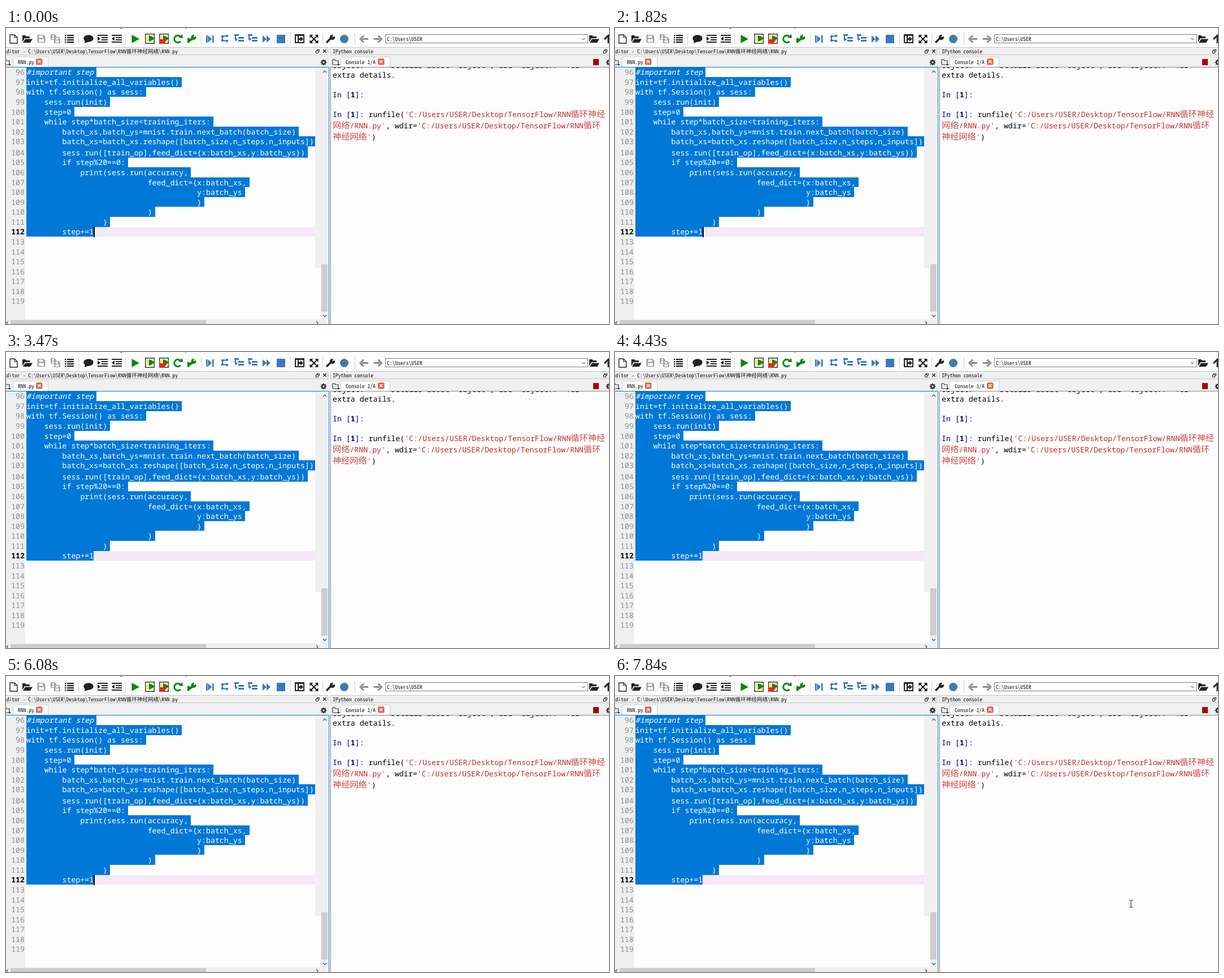
An HTML page with a canvas that plays this animation: 1067x525 px, repeating every 7990 ms.

```html
<!DOCTYPE html>
<html lang="en">
<head>
<meta charset="utf-8">
<title>Editor and console</title>
<style>
html, body { margin: 0; width: 100%; height: 100%; overflow: hidden; background: #fdfdfd; }
canvas { display: block; }
</style>
</head>
<body>
<canvas id="stage" width="1067" height="525"></canvas>
<script>
const W = 1067, H = 525, LOOP = 7990;
const stage = document.getElementById('stage').getContext('2d');
const scene = document.createElement('canvas');
scene.width = W;
scene.height = H;
const g = scene.getContext('2d');
g.textRendering = 'geometricPrecision';

const BLUE = '#0078d7', STEEL = '#3a78bf', GREEN = '#0c870c', BLACK = '#222', GRAY = '#a4a4a4';
const PANEL = '#f0f0f0', PAPER = '#fdfdfd', RED = '#c02a24', NAVY = '#000080';
const CODE = '"Noto Sans Mono", "DejaVu Sans Mono", monospace';
const LABEL = '"Noto Sans Mono CJK SC", "Noto Sans Mono", monospace';
const HAN = '"Noto Sans CJK SC Light", "Noto Sans CJK SC", "Noto Sans CJK JP", sans-serif';
const CHAR = 7.95, ROW = 17.57, LEFT = 36, FIRST = 96;

// Font size at which one monospaced cell has the given advance.
function sizeFor(family, advance) {
  g.font = `100px ${family}`;
  return advance * 100 / g.measureText('0').width;
}
const codeSize = sizeFor(CODE, CHAR), labelSize = sizeFor(LABEL, 4.82);

function rect(x, y, w, h, color) {
  g.fillStyle = color;
  g.fillRect(x, y, w, h);
}
function frame(x, y, w, h, color, width = 1) {
  g.strokeStyle = color;
  g.lineWidth = width;
  g.strokeRect(x, y, w, h);
}
function trace(pts) {
  g.beginPath();
  for (let i = 0; i < pts.length; i += 2) g.lineTo(pts[i], pts[i + 1]);
}
function poly(color, ...pts) {
  trace(pts);
  g.fillStyle = color;
  g.fill();
}
function line(color, width, ...pts) {
  trace(pts);
  g.strokeStyle = color;
  g.lineWidth = width;
  g.stroke();
}
function disc(x, y, r, color) {
  g.beginPath();
  g.arc(x, y, r, 0, 7);
  g.fillStyle = color;
  g.fill();
}
function text(s, x, y, color, font) {
  g.font = font;
  g.fillStyle = color;
  g.fillText(s, x, y);
  return x + g.measureText(s).width;
}
const code = (s, x, y, color, style = '') => text(s, x, y, color, `${style} ${codeSize}px ${CODE}`);
const han = (s, x, y) => text(s, x, y, '#cb4a44', `300 15.2px ${HAN}`);
const label = (s, x, y) => text(s, x, y, '#111', `${labelSize}px ${LABEL}`);

function cross(x, y, r, color, width) {
  line(color, width, x - r, y - r, x + r, y + r);
  line(color, width, x + r, y - r, x - r, y + r);
}
function gear(x, y) {
  for (let i = 0; i < 4; i++) {
    const c = Math.cos(i * Math.PI / 4) * 5.2, s = Math.sin(i * Math.PI / 4) * 5.2;
    line('#333', 2, x - c, y - s, x + c, y + s);
  }
  disc(x, y, 3.9, '#333');
  disc(x, y, 1.7, PANEL);
}
function wrench(x, y, color) {
  line(color, 3.4, x, y + 14, x + 9, y + 5);
  disc(x + 10.5, y + 4.5, 4.6, color);
  poly(PAPER, x + 10, y + 4.5, x + 13, y - 2, x + 17, y + 2);
}
function folder(x, y) {
  poly(BLACK, x, y + 13, x, y + 1, x + 5, y + 1, x + 7, y + 3, x + 13, y + 3, x + 13, y + 6, x + 4, y + 6);
  poly(BLACK, x + 1, y + 14, x + 5, y + 7.5, x + 18, y + 7.5, x + 14, y + 14);
}
function smallFolder(x, y) {
  line('#333', 1.2, x, y + 9, x, y, x + 4, y, x + 5, y + 2, x + 10, y + 2, x + 10, y + 9, x, y + 9);
  poly('#333', x + 8, y + 8, x + 13, y + 8, x + 10.5, y + 11);
}
function floppy(x, y, s) {
  poly(GRAY, x, y, x + s - 3, y, x + s, y + 3, x + s, y + s, x, y + s);
  rect(x + 3, y + 1.5, s - 7, s * 0.28, PAPER);
  rect(x + 2.5, y + s * 0.55, s - 5, s * 0.35, PAPER);
}
function indent(x, dir) {
  rect(x, 12, 18, 2, BLACK);
  rect(x + 7, 16, 11, 2, BLACK);
  rect(x + 7, 20, 11, 2, BLACK);
  rect(x, 24, 18, 2, BLACK);
  const tip = dir > 0 ? x + 5 : x, base = dir > 0 ? x : x + 5;
  poly(BLACK, base, 15, tip, 19, base, 23);
}
function arrow(x, dir, color) {
  line(color, 3, x - 7 * dir, 19.5, x + 4 * dir, 19.5);
  line(color, 3, x + dir, 13.5, x + 7 * dir, 19.5, x + dir, 25.5);
}
function cell(x) {
  rect(x, 10, 17, 18, '#333');
  rect(x + 1.5, 11.5, 14, 15, '#fff');
  rect(x + 1.5, 14, 14, 10, '#f4ea7c');
  poly(GREEN, x + 7, 12.5, x + 18, 18.5, x + 7, 24.5);
}
function stepIcon(x, dir) {
  rect(x, 11, 8, 3, STEEL);
  rect(x + 7, 16, 10, 3, STEEL);
  rect(x + 7, 21, 10, 3, STEEL);
  line(STEEL, 2, x + 2, 14, x + 2, 20, x + 5, 20);
  poly(STEEL, x + 2 - dir * 2, 16, x + 6, 20, x + 2, 24);
}

function toolbar() {
  rect(0, 0, W, 34, PAPER);
  rect(202, 0, 4, 1, '#555');
  rect(317, 0, 2, 1, '#555');
  line(BLACK, 1.4, 7, 12, 15, 12, 20, 17, 20, 27, 7, 27, 7, 11.5);
  line(BLACK, 1.2, 15, 12, 15, 17, 20, 17);
  folder(29, 12);
  floppy(55.5, 12, 14);
  floppy(79, 11, 10);
  floppy(85, 16, 11);
  for (let y = 12; y < 27; y += 4) {
    rect(104, y, 2.5, 2.3, BLACK);
    rect(108, y, 12, 2.3, BLACK);
  }
  g.beginPath();
  g.ellipse(146, 18.5, 8.7, 6.2, 0, 0, 7);
  g.fillStyle = BLACK;
  g.fill();
  poly(BLACK, 140, 21, 147, 24, 139, 27);
  indent(162, 1);
  indent(187, -1);
  poly(GREEN, 222.5, 12, 236, 19.5, 222.5, 27);
  cell(246);
  cell(271);
  poly('#e02a20', 271, 20, 279, 20, 279, 17, 284, 22.5, 279, 28, 271, 28);
  g.beginPath();
  g.arc(304, 19.5, 6.2, 0.7, 5.5);
  g.strokeStyle = GREEN;
  g.lineWidth = 3;
  g.stroke();
  poly(GREEN, 305, 17, 313, 18, 312, 11);
  wrench(321.5, 12, GREEN);
  poly(GREEN, 321, 17, 331, 21, 321, 26);

  rect(354, 13, 2.6, 13, STEEL);
  poly(STEEL, 357.5, 13, 364, 19.5, 357.5, 26);
  rect(365, 13, 2.6, 13, STEEL);
  for (const [x, y] of [[383, 15], [391, 14], [383, 22], [391, 23]]) disc(x, y, 2.3, STEEL);
  line(STEEL, 2, 391, 14, 383, 15, 383, 22, 391, 23);
  stepIcon(404, 1);
  stepIcon(428, -1);
  poly(STEEL, 454, 13, 461, 19.5, 454, 26);
  poly(STEEL, 461, 13, 468, 19.5, 461, 26);
  rect(479, 12, 15, 15, STEEL);

  rect(511, 11, 17, 16, BLACK);
  rect(513, 14, 3, 11, PAPER);
  rect(518, 14, 8, 11, PAPER);
  poly(BLACK, 518, 18, 521, 18, 521, 15, 526, 19.5, 521, 24, 521, 21, 518, 21);
  cross(545, 19.5, 5.5, BLACK, 2.2);
  for (const dx of [-1, 1]) for (const dy of [-1, 1]) {
    const x = 545 + 7.5 * dx, y = 19.5 + 7.5 * dy;
    poly(BLACK, x, y, x - 6 * dx, y, x, y - 6 * dy);
  }
  wrench(567, 12, BLACK);
  disc(598.5, 19.5, 7.5, '#3f7cac');
  arrow(634, -1, '#8c8c8c');
  arrow(657.5, 1, '#8c8c8c');
  rect(671, 11, 359, 16, '#fff');
  frame(671.5, 11.5, 358, 15, '#7d7d7d');
  label(String.raw`C:\Users\USER`, 674, 23);
  line('#444', 1, 1019, 18, 1022, 21, 1025, 18);
  folder(1032, 12);
  line(BLACK, 3, 1059, 20, 1066, 13, 1073, 20);
  line(BLACK, 3, 1066, 13, 1066, 27);
  for (const x of [128, 211, 345, 503, 560, 617]) rect(x, 9, 1, 21, '#d2d2d2');
}

function floatIcon(x) {
  frame(x + 2.5, 38.5, 4, 3, '#222');
  rect(x + 0.5, 41, 5, 4, PANEL);
  frame(x + 0.5, 40.5, 4, 4, '#222');
}
function tab(x, w, name, nameX, closeX) {
  rect(x, 51, w, 18, '#fff');
  line('#cfcfcf', 1, x + 0.5, 69, x + 0.5, 51.5, x + w - 0.5, 51.5, x + w - 0.5, 69);
  label(name, nameX, 63.5);
  g.beginPath();
  g.roundRect(closeX, 54, 11.5, 11.5, 2.5);
  g.fillStyle = '#e2654f';
  g.fill();
  cross(closeX + 5.75, 59.75, 2.5, '#fff', 1.6);
}
function docks() {
  rect(0, 34, W, 36, PANEL);
  frame(-1.5, 34.5, 571, 13, '#c4c4c4');
  frame(574.5, 34.5, 500, 13, '#c4c4c4');
  label(String.raw`Editor - C:\Users\USER\Desktop\TensorFlow\RNN循环神经网络\RNN.py`, -4, 45);
  label('IPython console', 578, 45);
  floatIcon(548);
  cross(564, 41, 2.8, '#222', 1.4);
  floatIcon(1057);
  tab(12, 63, 'RNN.py', 21, 53);
  tab(592, 88, 'Console 1/A', 601, 658);
  smallFolder(-4, 56);
  smallFolder(578, 56);
  gear(562, 61);
  gear(1067, 61);
  rect(1039, 55, 10, 11, '#a80000');
}

const program = `#important step
init=tf.initialize_all_variables()
with tf.Session() as sess:
    sess.run(init)
    step=0
    while step*batch_size<training_iters:
        batch_xs,batch_ys=mnist.train.next_batch(batch_size)
        batch_xs=batch_xs.reshape([batch_size,n_steps,n_inputs])
        sess.run([train_op],feed_dict={x:batch_xs,y:batch_ys})
        if step%20==0:
            print(sess.run(accuracy,
                           feed_dict={x:batch_xs,
                                      y:batch_ys
                                      }
                           )
                 )
        step+=1`.split('\n');

// Row 104 is two pixels taller than the others.
const textTop = n => 70 + (n - FIRST) * ROW + (n >= 104 ? 2 : 0);
const rowTop = n => Math.floor(n === 104 ? textTop(n) - 2 : textTop(n));
const baseline = n => Math.round(textTop(n) + 13.3);

function editor() {
  rect(0, 70, 572, 455, PAPER);
  rect(0, 70, 34, 447, '#efefef');
  rect(155, rowTop(112), 392, rowTop(113) - rowTop(112), '#f6e9f6');
  g.save();
  g.beginPath();
  g.rect(0, 70, 547, 447);
  g.clip();
  program.forEach((s, i) => {
    const n = FIRST + i, last = i === program.length - 1;
    const w = Math.round(s.length * CHAR + (last ? 0 : 5));
    rect(LEFT, rowTop(n), w, rowTop(n + 1) - rowTop(n), BLUE);
    code(s, LEFT, baseline(n), '#fff', i ? '' : 'italic');
  });
  for (let n = FIRST; n < 120; n++) {
    const s = String(n), now = n === 112;
    code(s, 33 - s.length * CHAR, baseline(n), now ? '#000' : '#8e8e8e', now ? 'bold' : '');
  }
  g.restore();

  rect(547, 70, 10, 356, PANEL);
  rect(557, 70, 13, 447, PANEL);
  rect(558, 419, 11, 84, '#cdcdcd');
  line('#555', 1.3, 561, 79, 564, 76, 567, 79);
  line('#555', 1.3, 561, 509, 564, 512, 567, 509);
  rect(0, 517, 570, 8, PANEL);
  rect(8, 518, 346, 7, '#cdcdcd');
  line('#555', 1.3, 4, 520, 1, 523, 4, 526);
  line('#555', 1.3, 549, 520, 552, 523, 549, 526);
  rect(0, 69, 572, 1, BLUE);
  rect(571, 69, 1, 456, BLUE);
}

function prompt(y) {
  let x = code('In [', 578, y, NAVY);
  x = code('1', x, y, NAVY, 'bold');
  return code(']: ', x, y, NAVY);
}
function consolePane() {
  rect(572, 34, 2, 491, PANEL);
  rect(574, 69, 493, 456, '#828790');
  rect(575, 70, 492, 455, PAPER);
  g.save();
  g.beginPath();
  g.rect(575, 70, 492, 455);
  g.clip();
  code("object?   -> Details about 'object', use 'object??' for", 578, 71, '#000');
  code('extra details.', 578, 88, '#000');
  prompt(123);
  let x = code('runfile(', prompt(158), 158, '#000');
  x = code("'C:/Users/USER/Desktop/TensorFlow/RNN", x, 158, RED);
  han('循环神经', x, 158);
  x = han('网络', 578, 178);
  x = code("/RNN.py'", x, 178, RED);
  x = code(', wdir=', x, 178, '#000');
  x = code("'C:/Users/USER/Desktop/TensorFlow/RNN", x, 178, RED);
  han('循环', x, 178);
  x = han('神经网络', 578, 198);
  x = code("'", x, 198, RED);
  code(')', x, 198, '#000');
  g.restore();
}

toolbar();
docks();
editor();
consolePane();

const toggles = [270, 830, 1260, 1820, 2350, 2910, 3470, 4000, 4430, 4960, 5490, 6080, 6540, 7130, 7720];

function pointer(x, y) {
  stage.fillStyle = '#333';
  stage.fillRect(x - 0.5, y - 6, 1.2, 12);
  for (const dy of [-7, 5.5]) {
    stage.fillRect(x - 3, y + dy, 2.5, 1.2);
    stage.fillRect(x + 0.7, y + dy, 2.5, 1.2);
  }
}
function draw(now) {
  const t = now % LOOP;
  stage.drawImage(scene, 0, 0);
  const caretOn = toggles.filter(at => at <= t).length % 2 === 0;
  if (caretOn) {
    stage.fillStyle = '#000';
    stage.fillRect(155, 353, 2, 18);
  }
  if (t >= 7840) pointer(913, 404);
  else if (t >= 7720) pointer(1051, 330);
  requestAnimationFrame(draw);
}
draw(0);
</script>
</body>
</html>
```
